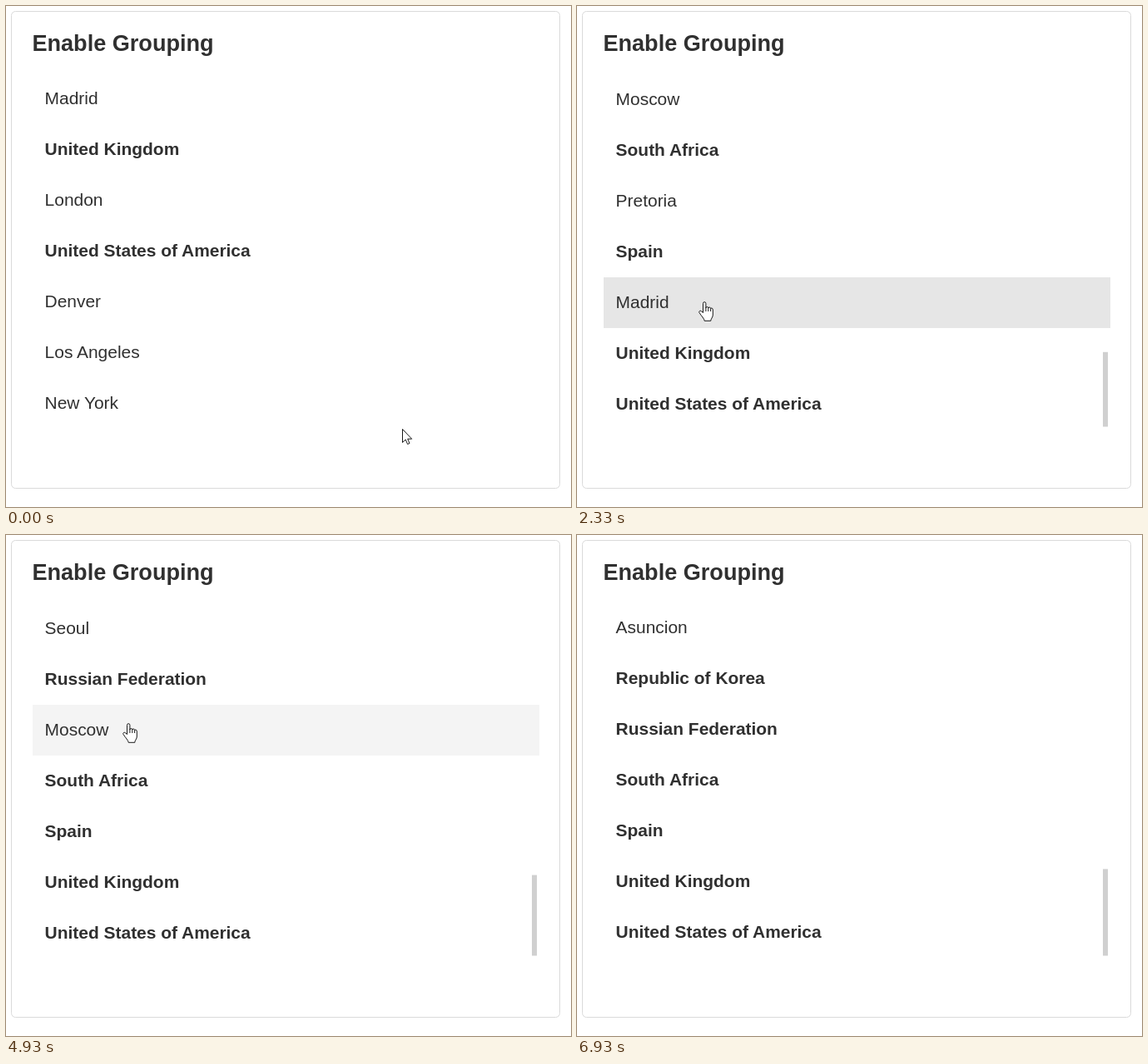
Animation of 679 by 602 pixels, one loop 7540 ms. Source, as an HTML page:

```html
<!DOCTYPE html>
<html lang="en">
<head>
<meta charset="utf-8">
<title>Enable Grouping</title>
<style>
html, body { margin: 0; width: 100%; height: 100%; overflow: hidden; background: #fff; }
svg { display: block; }
text { font: 20.95px "Liberation Sans", Arial, sans-serif; fill: #303030; }
.head { font-weight: bold; }
.title { font-size: 27.1px; font-weight: bold; }
.cursor { fill: #fff; stroke: #000; stroke-width: .9; stroke-linejoin: round; }
</style>
</head>
<body>
<svg width="679" height="602" viewBox="0 0 679 602">
  <rect x="6.5" y="6.5" width="659" height="573" rx="5" fill="#fff" stroke="#dadada"/>
  <text class="title" x="31.4" y="54">Enable Grouping</text>
  <rect id="hover" x="32" width="609" height="61"/>
  <g id="list"></g>
  <rect id="bar" x="632" width="6" fill="#d0d0d0"/>
  <g id="pointer" class="cursor">
    <path id="arrow" transform="translate(6 0)" d="M.5.5V16.5L4.2 13 6.6 18.5 9 17.5 6.7 12.2H11.7Z"/>
    <path id="hand" d="M5.5 13.5V2.5Q5.5.7 7.2.7T8.9 2.5V8Q9 6.5 10.4 6.5T11.8 8Q12 7 13.2 7T14.6 8.6Q14.8 8 15.9 8T17.3 10V16Q17.3 18 16 20T14.8 23.3H7.2Q7 21.5 5 19T1 13.5Q.3 12 1.5 11.4T4 12.2ZM8.9 8V12M11.8 8V12M14.6 8.6V12"/>
  </g>
</svg>
<script>
const LOOP = 7540, ROW = 61, ROWS = 7, TOP = 81, MOVE = 7, EXIT = 104;
const HOVER = "#f4f4f4", ACTIVE = "#e6e6e6";
const $ = id => document.getElementById(id);

// Times are in ticks of 1/15 s. The pointer leaves for (x, y), then clicks a
// heading there; the list sits a pixel lower until it settles.
const steps = [
  { leave: 0.7, x: 161, y: 290, click: 17, settle: 17, shade: HOVER },
  { leave: 20, x: 146, y: 355, click: 35, settle: 41, shade: ACTIVE },
  { leave: 38, x: 116, y: 296, click: 50, settle: 52, shade: ACTIVE },
  { leave: 54, x: 140, y: 229, click: 68, settle: 82, shade: HOVER },
  { leave: 73, x: 143, y: 169, click: 82, settle: 90, shade: ACTIVE },
  { leave: 87, x: 150, y: 106, click: 97, settle: 100, shade: ACTIVE }
];
const start = { x: 470, y: 508 }, exit = { leave: 97, x: 400, y: 490 };

// Each step collapses the group of the same index, from the bottom up.
const groups = [
  ["United States of America", "Denver", "Los Angeles", "New York"],
  ["United Kingdom", "London"],
  ["Spain", "Madrid"],
  ["South Africa", "Pretoria"],
  ["Russian Federation", "Moscow"],
  ["Republic of Korea", "Seoul"]
];

const lines = Array.from({ length: ROWS }, () => {
  const line = document.createElementNS("http://www.w3.org/2000/svg", "text");
  line.setAttribute("x", 46.6);
  return $("list").appendChild(line);
});

function set(el, attrs) {
  for (const key in attrs) el.setAttribute(key, attrs[key]);
}

function rowsAfter(clicks) {
  const rows = groups.map((group, i) => group
    .map((name, j) => ({ name, head: j === 0 }))
    .filter(row => row.head || i >= clicks));
  return [{ name: "Asuncion" }, ...rows.reverse().flat()].slice(-ROWS);
}

function pointerAt(tick) {
  let { x, y } = start;
  for (const stop of [...steps, exit]) {
    const u = Math.min(1, Math.max(0, (tick - stop.leave) / MOVE));
    const ease = u * u * (3 - 2 * u);
    x += (stop.x - x) * ease;
    y += (stop.y - y) * ease;
  }
  return [Math.round(x), Math.round(y)];
}

function draw(ms) {
  const tick = Math.floor(ms * 0.015 + 0.06);
  const clicks = steps.filter(step => tick >= step.click).length;
  const last = steps[clicks - 1];
  const lowered = clicks > 0 && tick < last.settle;
  const top = TOP + (lowered ? 1 : 0);

  const rows = rowsAfter(clicks);
  rows.forEach((row, i) => {
    lines[i].textContent = row.name;
    set(lines[i], { y: top + 37 + ROW * i, class: row.head ? "head" : "" });
  });

  const [x, y] = pointerAt(tick);
  const visible = tick < EXIT, isArrow = y > 500;
  set($("pointer"), { transform: `translate(${x} ${y})`, visibility: visible ? "visible" : "hidden" });
  set($("arrow"), { display: isArrow ? "inline" : "none" });
  set($("hand"), { display: isArrow ? "none" : "inline" });

  const index = Math.floor((y - top) / ROW), row = rows[index];
  const hot = visible && row && !row.head;
  set($("hover"), { y: top + ROW * index, fill: !hot ? "none" : lowered ? last.shade : HOVER });

  const barTop = 423 - 3.6 * clicks;
  set($("bar"), { y: barTop, height: 505.5 - barTop, display: tick > 1 ? "inline" : "none" });
}

function frame() {
  draw(performance.now() % LOOP);
  requestAnimationFrame(frame);
}
frame();
</script>
</body>
</html>
```
